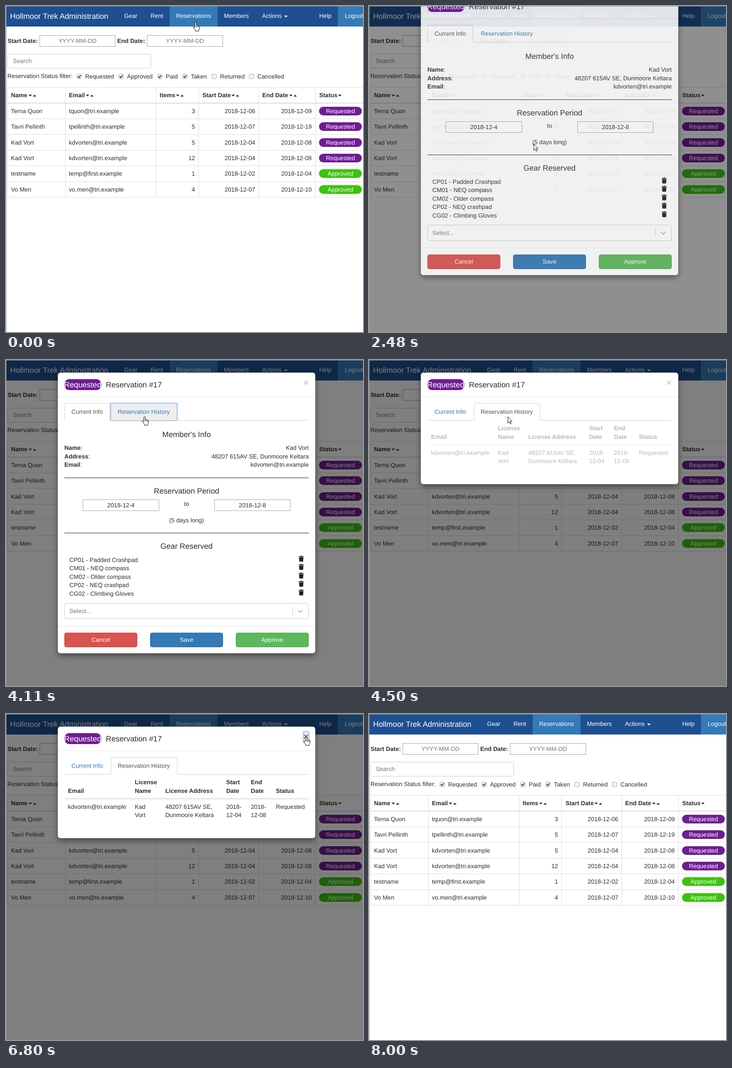
These frames come from a looping animation (783x715 px, 8250 ms). An HTML page:

```html
<!DOCTYPE html>
<html lang="en">
<head>
<meta charset="utf-8">
<title>Reservations</title>
<style>
  html, body { margin: 0; width: 100%; height: 100%; overflow: hidden; background: #fff; }
  svg { display: block; width: 783px; height: 715px; }
  text {
    font: 13.12px "Liberation Sans", Arial, sans-serif;
    fill: #2e2e2e; text-rendering: geometricPrecision; white-space: pre;
  }
  .b { font-weight: bold; }
  .h { font-size: 16.88px; }
  .mid { text-anchor: middle; }
  .end { text-anchor: end; }
  .w { fill: #fff; }
  .ph { fill: #777; }
  .link { fill: #337ab7; }
  .tab { fill: #555; }
  .x { font-size: 19.7px; font-weight: bold; fill: #000; }
</style>
</head>
<body>
<svg id="stage" viewBox="0 0 783 715" xmlns="http://www.w3.org/2000/svg"></svg>
<script>
const LOOP = 8250;
const PURPLE = '#701c93', GREEN = '#3bc40c', BLUE = '#337ab7';

// Markup helpers
const text = (x, y, s, cls = '') => `<text x="${x}" y="${Math.round(y)}" class="${cls}">${s}</text>`;
const rect = (x, y, w, h, fill, stroke = 'none', r = 0, more = '') =>
  `<rect x="${x}" y="${y}" width="${w}" height="${h}" rx="${r}" fill="${fill}" stroke="${stroke}" ${more}/>`;
const path = (d, fill = 'none', stroke = 'none', more = '') =>
  `<path d="${d}" fill="${fill}" stroke="${stroke}" ${more}/>`;
const group = (id, body) => `<g id="${id}">${body}</g>`;
const caret = (x, y, dir) => path(`M${x} ${y}h7.5l-3.75 ${3.75 * dir}z`, '#222');
const field = (x, y, w, s, cls) =>
  rect(x, y, w, 24, '#fff', '#a6a6a6') + text(x + w / 2, y + 16.5, s, 'mid ' + cls);

function navbar() {
  const items = [['Gear', 259], ['Rent', 317], ['Reservations', 373], ['Members', 478],
    ['Actions', 561.5], ['Help', 687], ['Logout', 743]];
  return rect(0, 0, 783, 45, '#1e5091') + rect(359, 0, 105, 45, BLUE) + rect(728, 0, 55, 45, BLUE) +
    text(9, 27.5, 'Hollmoor Trek Administration', 'w h') +
    items.map(([s, x]) => text(x, 26, s, 'w')).join('') + path('M610 21h8l-4 4z', '#fff');
}

function filters() {
  const boxes = [['Requested', 155, 1], ['Approved', 247, 1], ['Paid', 332, 1],
    ['Taken', 387, 1], ['Returned', 451, 0], ['Cancelled', 533, 0]];
  return text(3.5, 81, 'Start Date:', 'b') + field(74, 64.5, 165.5, 'YYYY-MM-DD', 'ph') +
    text(244, 81, 'End Date:', 'b') + field(309.5, 64.5, 166, 'YYYY-MM-DD', 'ph') +
    rect(3.5, 105.5, 314, 31, '#fff', '#ccc', 4) + text(15, 125, 'Search', 'ph') +
    text(3, 158, 'Reservation Status filter:') +
    boxes.map(([s, x, on]) => rect(x + .5, 149.5, 10, 10, '#f4f4f4', '#aaa', 2) +
      (on ? path(`M${x + 2.5} 154.5l2.3 2.5 4-5`, 'none', '#333', 'stroke-width="2"') : '') +
      text(x + 18.5, 159, s)).join('');
}

function table() {
  const pitch = 34.4;
  const heads = [['Name', 11, 49.5], ['Email', 138, 175], ['Items', 337, 373],
    ['Start Date', 431, 494.5], ['End Date', 562, 621], ['Status', 687, 728.5]];
  const mail = s => s + '@tri.example';
  const rows = [
    ['Terna Quon', mail('tquon'), 3, '06', '09'],
    ['Tavri Pellinth', mail('tpellinth'), 5, '07', '19'],
    ['Kad Vort', mail('kdvorten'), 5, '04', '08'],
    ['Kad Vort', mail('kdvorten'), 12, '04', '08'],
    ['testname', 'temp@first.example', 1, '02', '04'],
    ['Vo Men', mail('vo.men'), 4, '07', '10']];
  let lines = 'M783 178.5H3.5V419.5H783';
  for (const x of [130.5, 329.5, 422.5, 554.5, 678.5]) lines += `M${x} 178.5V419.5`;
  for (let i = 1; i < 6; i++) lines += `M3.5 ${Math.floor(213 + i * pitch) + .5}H783`;
  return path(lines, 'none', '#ddd') + path('M3 213H783', 'none', '#ddd', 'stroke-width="2"') +
    heads.map(([s, x, c]) => text(x, 200, s, 'b') + caret(c, 194.5, 1) +
      (s === 'Status' ? '' : caret(c + 9.5, 198.5, -1))).join('') +
    rows.map(([name, email, n, from, to], i) => {
      const y = Math.round(234.7 + i * pitch), ok = i > 3;
      return text(11, y, name) + text(138, y, email) + text(414.5, y, n, 'end') +
        text(546.5, y, '2018-12-' + from, 'end') + text(670.5, y, '2018-12-' + to, 'end') +
        rect(686.5, y - 14, 94, 19, ok ? GREEN : PURPLE, 'none', 9.5) +
        text(733.5, y, ok ? 'Approved' : 'Requested', 'w mid');
    }).join('');
}

const ADDRESS = ['48207 615AV SE,', 'Dunmoore Keltara'];
const EMAIL = 'kdvorten@tri.example';

function tabs(active) {
  const [l, r] = active ? [230.5, 375.5] : [128.5, 227.5];
  return path(`M128 132.5H${l}V99q0-4 4-4H${r - 4}q4 0 4 4V132.5H664`, 'none', '#d4d4d4') +
    text(143.5, 118, 'Current Info', active ? 'link' : 'tab') +
    text(245, 118, 'Reservation History', active ? 'tab' : 'link');
}

function trash(x, y) {
  return path(`M${x - 5.5} ${y + 1.5}h3.5l1-1.5h2l1 1.5h3.5v1.7h-11zM${x - 4.8} ${y + 4}h9.6l-.7 9.2h-8.2z`, '#222');
}

function infoPane() {
  const details = [['Name', 'Kad Vort'], ['Address', ADDRESS.join(' ')], ['Email', EMAIL]];
  const gear = ['CP01 - Padded Crashpad', 'CM01 - NEQ compass', 'CM02 - Older compass',
    'CP02 - NEQ crashpad', 'CG02 - Climbing Gloves'];
  const buttons = [['Cancel', 128.5, '#d9534f', '#d43f3a'], ['Save', 316.5, BLUE, '#2e6da4'],
    ['Approve', 504.5, '#5cb85c', '#4cae4c']];
  const title = (y, s) => text(396, y, s, 'mid h');
  return title(169, "Member's Info") +
    details.map(([k, v], i) => {
      const y = 197 + i * 18.5;
      return text(128, y, `<tspan class="b">${k}</tspan>:`) + text(664, y, v, 'end');
    }).join('') +
    path('M128 258.5H664M128 379.5H664', 'none', '#222') +
    title(293, 'Reservation Period') +
    field(168.5, 306.5, 167, '2018-12-4', '') + text(396, 320, 'to', 'mid') +
    field(457.5, 306.5, 166, '2018-12-8', '') + text(396, 356, '(5 days long)', 'mid') +
    title(414, 'Gear Reserved') +
    gear.map((s, i) => text(139, 443 + i * 18.4, s) +
      trash(647.5, Math.round(429 + i * 18.4))).join('') +
    rect(128.5, 533.5, 535, 34, '#fff', '#ccc', 4) + text(139, 555, 'Select...', 'ph') +
    path('M628.5 541V560', 'none', '#ccc') +
    path('M640.5 548.5l5 5 5-5', 'none', '#bbb', 'stroke-width="2"') +
    path('M115 583.5H677', 'none', '#e5e5e5') +
    buttons.map(([s, x, fill, line]) => rect(x, 598.5, 159, 31, fill, line, 4) +
      text(x + 79.5, 618, s, 'mid w')).join('');
}

function historyPane() {
  const cols = [[136, ['', 'Email'], [EMAIL, '']], [282.5, ['License', 'Name'], ['Kad', 'Vort']],
    [349.5, ['', 'License Address'], ADDRESS], [483, ['Start', 'Date'], ['2018-', '12-04']],
    [537, ['End', 'Date'], ['2018-', '12-08']], [592, ['', 'Status'], ['Requested', '']]];
  return path('M128 186H664', 'none', '#ddd', 'stroke-width="2"') +
    cols.map(([x, head, body]) => [0, 1].map(i =>
      text(x, 154 + i * 18.5, head[i], 'b') + text(x, 207.8 + i * 18.5, body[i])).join('')).join('');
}

function modal() {
  return rect(114, 32, 564, 616, '#000', 'none', 6, 'id="shadow" opacity=".5" filter="url(#blur)"') +
    rect(113.5, 27.5, 565, 616, '#fff', 'rgba(0,0,0,.2)', 6, 'id="sheet"') +
    path('M114 80.5H678', 'none', '#e5e5e5') +
    group('named', rect(128, 42, 81, 24, PURPLE, 'none', 11) +
      `<g clip-path="url(#pill)">${text(127.5, 60, 'Requested', 'w h')}</g>` +
      text(219, 60, 'Reservation #17', 'h')) +
    group('unnamed', text(139, 60, 'Reservation #undefined', 'h')) +
    rect(652, 38.5, 12.5, 23, '#e8f0fa', '#7fb0e6', 2, 'id="ring" stroke-width="1.5"') +
    `<text id="close" x="658.3" y="55.5" class="x mid">×</text>` +
    rect(229.5, 94.5, 146, 38.5, '#eee', '#eee', 2, 'id="hover" stroke-width="1.6"') +
    group('tab0', tabs(0)) + group('tab1', tabs(1)) +
    group('info', infoPane()) + group('history', historyPane());
}

const cursor =
  group('arrow', path('M.5 .5V14.5L3.7 11.5 5.8 16.4 7.8 15.6 5.8 10.8H10z', '#fff', '#111')) +
  group('hand', path('M-1.6 11V1.8a1.6 1.6 0 0 1 3.2 0V7a1.5 1.5 0 0 1 2.6 .4 1.4 1.4 0 0 1 2.4 .6' +
    ' 1.3 1.3 0 0 1 2.1 1.2V13L7 16.5V19H-.5V17L-5 11.5q-.6-1.9 1-1.9z', '#fff', '#111') +
    path('M1.6 7v3.5M4.2 7.5v3M6.6 8v3', 'none', '#111'));

const stage = document.getElementById('stage');
stage.innerHTML = `<defs>
  <filter id="blur" x="-20%" y="-40%" width="140%" height="180%"><feGaussianBlur stdDeviation="6.5"/></filter>
  <clipPath id="pill">${rect(128, 42, 81, 24, '#000', 'none', 11)}</clipPath></defs>` +
  rect(0, 0, 783, 715, '#fff') + navbar() + filters() + table() +
  rect(1, 1, 782, 714, '#000', 'none', 0, 'id="backdrop"') +
  group('modal', modal()) + path('M.5 715V.5H783', 'none', '#a0a0a0') + group('cursor', cursor);

const el = {};
stage.querySelectorAll('[id]').forEach(n => el[n.id] = n);
const set = (id, attr, v) => el[id].setAttribute(attr, v);
const show = (id, on) => set(id, 'display', on ? 'inline' : 'none');
const clamp = v => Math.max(0, Math.min(1, v));
const easeOut = v => 1 - (1 - clamp(v)) ** 1.7;

// Bursts of screen updates: start, end, count
const bursts = [[280, 1300, 9], [1450, 1960, 5], [2330, 2750, 4], [3150, 4110, 8], [4230, 4650, 4],
  [5020, 5020, 1], [5330, 6230, 8], [6380, 7310, 8], [7460, 8000, 5]];

function snap(t) {
  let out = 0;
  for (const [from, to, n] of bursts) {
    if (t < from) break;
    const step = (to - from) / (n - 1 || 1) || 1;
    out = from + Math.min(n - 1, Math.floor((t - from) / step + .1)) * step;
  }
  return out;
}

// Pointer hotspot: time, x, y
const route = [[0, 416, 36], [280, 404, 62], [535, 200, 140], [790, 45, 228], [1045, 215, 252],
  [1300, 365, 266], [1450, 365, 270], [1960, 361, 302], [2750, 361, 302], [3150, 360, 290],
  [3970, 304, 124], [4650, 304, 124], [5020, 304, 123], [5330, 330, 122], [5970, 666, 40],
  [6230, 658, 49], [7045, 658, 50], [7178, 656, 160], [7310, 648, 438], [7460, 655, 470],
  [7865, 731, 690], [8000, 733, 730]];
const handTimes = [[0, 279], [780, 2329], [3690, 4229], [5960, 7000]];

function pointer(t) {
  let i = 1;
  while (i < route.length - 1 && route[i][0] < t) i++;
  const [t0, x0, y0] = route[i - 1], [t1, x1, y1] = route[i];
  const k = clamp((t - t0) / (t1 - t0));
  return [x0 + (x1 - x0) * k, y0 + (y1 - y0) * k];
}

const OPEN = 2330, CLOSE = 6874, SWAP = 4460, FADE = 160, SLIDE = 300;

function draw(time) {
  const t = snap(time);
  const closing = t >= CLOSE, history = t >= SWAP && !closing;
  const height = closing ? 150 : history ? 245 : 616;
  const since = t - (closing ? CLOSE : OPEN);
  const fade = closing ? 1 - clamp(since / FADE) : clamp(since / FADE);
  const lift = closing ? easeOut(since / SLIDE) : 1 - easeOut(since / SLIDE);

  set('backdrop', 'opacity', fade / 2);
  set('modal', 'opacity', fade);
  show('modal', fade > 0);
  set('modal', 'transform', `translate(0 ${-Math.round(lift * height / 4)})`);
  set('sheet', 'height', height);
  set('shadow', 'height', height);
  show('named', !closing);
  show('unnamed', closing);

  const second = t >= 4229 && !closing;
  show('tab0', !second);
  show('tab1', second);
  show('hover', t > 3690 && t < 4229);
  set('hover', 'stroke', t > 4100 ? '#7fb0e6' : '#eee');
  show('info', !history && !closing);
  set('info', 'opacity', 1 - clamp((t - 4310) / 150));
  show('history', history);
  set('history', 'opacity', clamp((t - SWAP) / 150));
  show('ring', t > 6700);
  set('close', 'opacity', t > 5960 ? .55 : .2);

  const [x, y] = pointer(t);
  const hand = handTimes.some(([a, b]) => t >= a && t <= b);
  set('cursor', 'transform', `translate(${Math.round(x)} ${Math.round(y)})`);
  show('hand', hand);
  show('arrow', !hand);
}

const start = performance.now();
function tick() {
  draw((performance.now() - start) % LOOP);
  requestAnimationFrame(tick);
}
draw(0);
requestAnimationFrame(tick);
</script>
</body>
</html>
```
